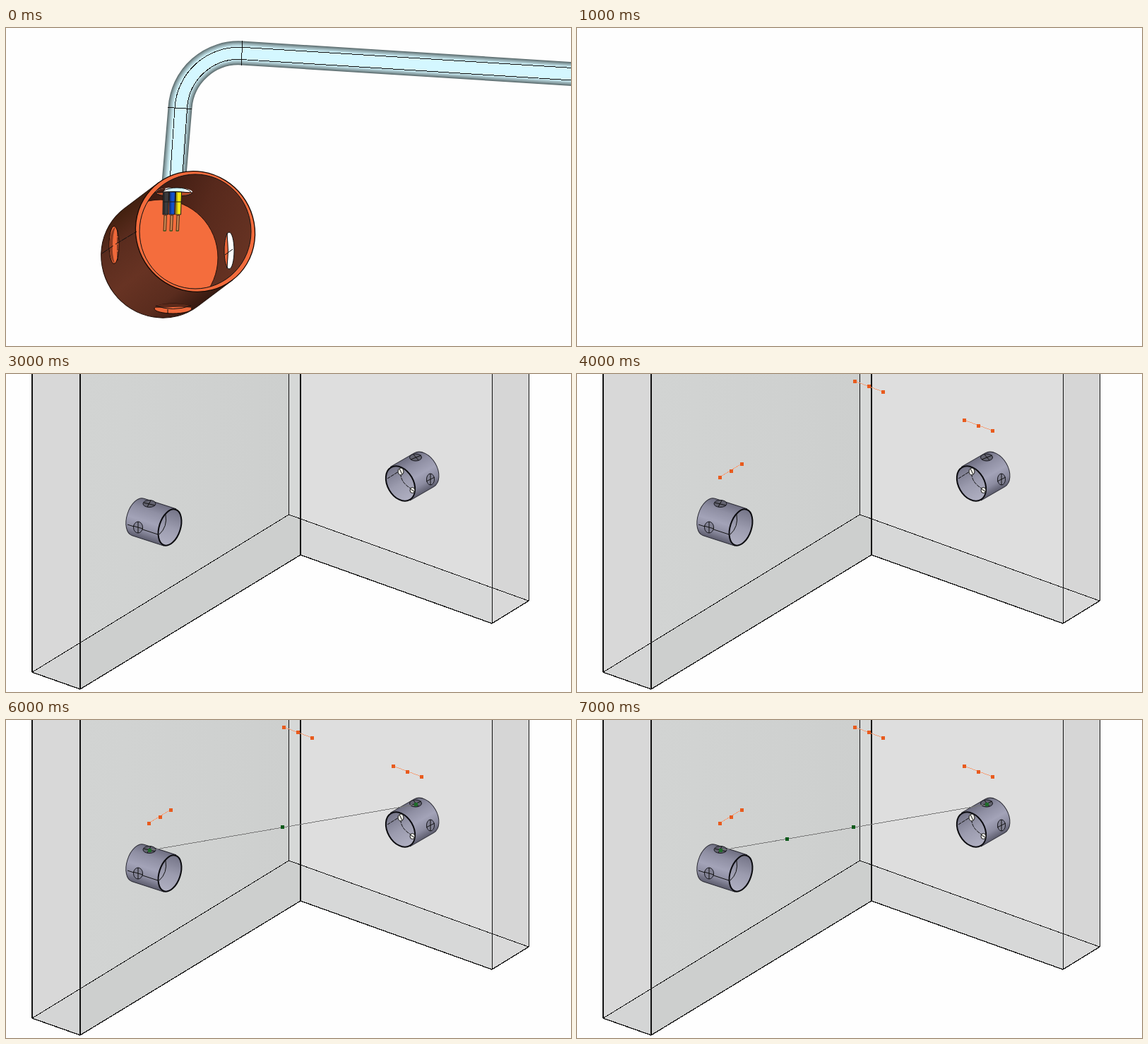
These frames come from a looping animation (800 px wide and 450 px high, 8000 ms). An HTML page:

```html
<!DOCTYPE html>
<html lang="en">
<head>
<meta charset="utf-8">
<title>Conduit between two boxes</title>
<style>
html, body { margin: 0; width: 100%; height: 100%; overflow: hidden; background: #fefefe; }
svg { display: block; width: 100vw; height: 100vh; }
.step { animation: 8s step-end infinite; }
#detail { animation-name: detail; }
#walls { animation-name: walls; }
#boxes { animation-name: boxes; }
#guides { animation-name: guides; }
#ends { animation-name: ends; }
#draft { animation-name: draft; }
#wire { animation-name: wire; }
#knot { animation-name: knot; }
@keyframes detail { 0% { opacity: 1 } 12.5%, 100% { opacity: 0 } }
@keyframes walls { 0% { opacity: 0 } 25%, 100% { opacity: 1 } }
@keyframes boxes { 0% { opacity: 0 } 37.5%, 100% { opacity: 1 } }
@keyframes guides { 0% { opacity: 0 } 50%, 100% { opacity: 1 } }
@keyframes ends { 0% { opacity: 0 } 62.5%, 100% { opacity: 1 } }
@keyframes draft { 0% { opacity: 0 } 62.5% { opacity: 1 } 75%, 100% { opacity: 0 } }
@keyframes wire { 0% { opacity: 0 } 75%, 100% { opacity: 1 } }
@keyframes knot { 0% { opacity: 0 } 87.5%, 100% { opacity: 1 } }
.ln { fill: none; stroke: #111; stroke-width: 1; }
.crisp { shape-rendering: crispEdges; }
.hole { fill: #62626f; stroke: #16161c; }
</style>
</head>
<body>
<svg viewBox="0 0 800 450" preserveAspectRatio="none">
<defs>
  <linearGradient id="outer" gradientUnits="userSpaceOnUse" x1="0" y1="-87" x2="0" y2="87">
    <stop offset="0" stop-color="#42200f"/><stop offset=".2" stop-color="#5a2c1e"/>
    <stop offset=".5" stop-color="#673323"/><stop offset=".8" stop-color="#5a2c1e"/><stop offset="1" stop-color="#371910"/>
  </linearGradient>
  <linearGradient id="inner" gradientUnits="userSpaceOnUse" x1="190" y1="250" x2="345" y2="320">
    <stop offset="0" stop-color="#3a1a11"/><stop offset=".5" stop-color="#57291c"/><stop offset="1" stop-color="#673323"/>
  </linearGradient>
  <linearGradient id="steel" gradientUnits="userSpaceOnUse" x1="0" y1="-27" x2="0" y2="27">
    <stop offset="0" stop-color="#6f6f82"/><stop offset=".25" stop-color="#8f8fa3"/>
    <stop offset=".55" stop-color="#a3a3b8"/><stop offset=".8" stop-color="#8c8ca0"/><stop offset="1" stop-color="#5f5f70"/>
  </linearGradient>
  <linearGradient id="bore" x1="0" y1="0" x2="0" y2="1">
    <stop offset="0" stop-color="#747487"/><stop offset=".5" stop-color="#9b9bae"/><stop offset="1" stop-color="#b0b0c2"/>
  </linearGradient>
  <linearGradient id="side" x1="0" y1="0" x2="1" y2="0">
    <stop offset="0" stop-color="#d2d4d3"/><stop offset="1" stop-color="#cdcfce"/>
  </linearGradient>
  <clipPath id="mouth"><ellipse cx="268" cy="288" rx="79" ry="81"/></clipPath>
  <clipPath id="slot"><ellipse cx="316" cy="315" rx="7" ry="26"/></clipPath>
  <clipPath id="entry"><ellipse cx="238" cy="232" rx="26" ry="6"/></clipPath>
</defs>

<g id="detail" class="step">
  <g id="pipe" fill="none"></g>
  <g class="ln crisp">
    <path d="M810 57L334.500 27.300A91 91 0 0 0 239 113L232.500 210M810 74.500L333.500 44.500A73 73 0 0 0 256.500 114L250 208"/>
    <path d="M335 18L333 53M229 112.500L263 114.500"/>
  </g>
  <g transform="translate(268 288) rotate(-37)">
    <path d="M0-86.500H-61A83.500 86.500 0 0 0-61 86.500H0Z" fill="url(#outer)" stroke="#1d0c06"/>
    <ellipse rx="83.500" ry="86.500" fill="#f26b3c" stroke="#160904" stroke-width="1.300"/>
  </g>
  <g clip-path="url(#mouth)">
    <rect x="180" y="200" width="180" height="180" fill="url(#inner)"/>
    <ellipse cx="219" cy="325" rx="81" ry="82" fill="#f46d3d" stroke="#2a1109"/>
  </g>
  <ellipse class="ln" cx="268" cy="288" rx="79" ry="81"/>
  <g clip-path="url(#entry)">
    <rect x="210" y="224" width="56" height="16" fill="#fefefe"/>
    <path d="M229 224H252V234H229Z" fill="#d4f7ff"/>
    <path d="M210 233Q238 230 266 233V240H210Z" fill="#b84e2b"/>
    <path d="M210 224H228L222 233H210Z" fill="#471f14"/>
  </g>
  <path class="ln" d="M212 233Q238 230 264 233Q262 238 238 238Q214 238 212 233M222 231Q230 226 242 226Q256 226 262 232"/>
  <g clip-path="url(#slot)">
    <rect x="308" y="288" width="16" height="54" fill="#fefefe"/>
    <path d="M308 288H313Q316 315 313 342H308Z" fill="#e96539"/>
  </g>
  <path class="ln" d="M313 290Q316 315 313 340M310 321L321 313"/>
  <ellipse class="ln" cx="316" cy="315" rx="7" ry="26"/>
  <ellipse cx="153" cy="307" rx="7" ry="26.500" fill="#ee683a" stroke="#160904"/>
  <path d="M155 281Q147 287 146.500 307Q147 328 154 333Q150 320 151 307Q151 292 155 281Z" fill="#8c3c22"/>
  <path class="ln" d="M136 319L152 308M155 306L185 288M158 286V329" stroke-dasharray="9 1"/>
  <ellipse cx="236.500" cy="397" rx="26.500" ry="7" fill="#ee683a" stroke="#160904"/>
  <path d="M210 396Q213 390 236 390Q260 390 263 396Q250 394 236 395Q222 396 210 396Z" fill="#5a291a"/>
  <path class="ln" d="M212 393Q236 402 262 393M229 398V404"/>
  <g id="cores" stroke="#1a1a1a"></g>
</g>

<g id="walls" class="step">
  <path d="M37 0H105V446L37 422Z" fill="#d8d8d8"/>
  <path d="M105 0H417V256L105 446Z" fill="url(#side)"/>
  <path d="M400 0H417V205L400 199Z" fill="#d6d8d7"/>
  <path d="M105 380L400 199L417 205V256L105 446Z" fill="#cdcfce"/>
  <path d="M37 422L105 380V446Z" fill="#d4d5d5"/>
  <path d="M417 0H688V303L417 205Z" fill="#dedede"/>
  <path d="M417 205L688 303V353L417 256Z" fill="#d7d8d8"/>
  <path d="M688 0H740V321L688 303Z" fill="#d6d6d6"/>
  <path d="M688 303L740 321L688 353Z" fill="#d9d9d9"/>
  <g class="ln crisp">
    <path d="M400.500 0V199M688.500 0V353M740.500 0V321M37 422L400.500 199L740 321"/>
    <path d="M37 422L105 446L417 256L688 353L740 321" stroke-width="1.300"/>
    <path d="M37 0V422M105 0V446M417 0V256" stroke-width="2"/>
  </g>
</g>

<g id="boxes" class="step">
  <g transform="translate(232 217) rotate(18)">
    <path d="M0-27.500H-47.500A15.500 27.500 0 0 0-47.500 27.500H0Z" fill="url(#steel)" stroke="#2a2a33"/>
    <ellipse rx="15" ry="26.500" fill="url(#bore)" stroke="#0c0c10" stroke-width="2"/>
  </g>
  <path class="ln" d="M172 213L215 227M226 199Q229 216 217 227"/>
  <ellipse class="hole" cx="203" cy="183.500" rx="9" ry="5"/>
  <ellipse class="hole" cx="187" cy="217" rx="6.500" ry="8" style="fill:#828294"/>
  <path class="ln" d="M195 182L211 186M205 179L200 188M180 215L194 219M187 209V225"/>
  <g transform="translate(558.500 155) rotate(-30)">
    <path d="M0-27.500H38.500A18.500 27.500 0 0 1 38.500 27.500H0Z" fill="url(#steel)" stroke="#2a2a33"/>
    <ellipse rx="18.300" ry="26.500" fill="url(#bore)" stroke="#0c0c10" stroke-width="2"/>
  </g>
  <path class="ln" d="M540 148L556 138M559 135Q556 154 577 164" stroke-dasharray="5 1"/>
  <ellipse cx="559" cy="138" rx="4" ry="5" fill="#eeeee8" stroke="#111"/>
  <ellipse cx="575.500" cy="164.500" rx="3.500" ry="4" fill="#eeeee8" stroke="#111"/>
  <path class="ln" d="M557 134L561 142M573 163L578 166"/>
  <ellipse class="hole" cx="580" cy="118" rx="8.500" ry="5"/>
  <ellipse class="hole" cx="601" cy="149" rx="5.500" ry="8" style="fill:#828294"/>
  <path class="ln" d="M573 121L588 115M577 114L584 122M595 152L607 146M601 141V157"/>
</g>

<g id="guides" class="step crisp" fill="#e85b1e" stroke="#f3a17c"></g>
<g id="draft" class="step crisp"><path d="M204 184.500L580 119.500" stroke="#22ff22" stroke-width="1.200"/></g>
<g id="wire" class="step crisp">
  <path d="M206 184L578 120" stroke="#777"/>
  <rect x="389" y="149" width="5" height="5" fill="#0b5a1a"/>
</g>
<g id="ends" class="step crisp" fill="#1f6b2a">
  <rect x="201" y="182" width="5" height="5"/><rect x="578" y="117" width="5" height="5"/>
</g>
<rect id="knot" class="step crisp" x="295" y="166" width="5" height="5" fill="#0b5a1a"/>
</svg>
<script>
const add = (id, markup) => document.getElementById(id).innerHTML += markup;

// Nested strokes shade the tube from its rim to the flat middle
const rim = [92, 108, 110], mid = [212, 247, 255], layers = 9;
for (let i = 0; i < layers; i++) {
  const k = Math.pow(i / (layers - 1), 0.8);
  const rgb = rim.map((c, j) => Math.round(c + (mid[j] - c) * k));
  add('pipe', `<path d="M810 65.600L334 35.500A83 83 0 0 0 246.500 113L237 225" stroke="rgb(${rgb})" stroke-width="${34 - i * 2}"/>`);
}

// Insulated cores with bare copper tips
['#3b3b3d', '#1450c8', '#f5e611'].forEach((color, i) => {
  const x = 222.5 + i * 9;
  add('cores', `<path d="M${x} 232h8l-1 32h-7.500z" fill="${color}"/>
    <path d="M${x + 0.8} 233h1.500v30h-1.500z" fill="#000" opacity=".35" stroke="none"/>
    <path d="M${x + 0.5} 246h8" fill="none"/>
    <path d="M${x + 1.5} 265h3.500l-1 22h-3.500z" fill="#c98450" stroke="#4c2a14"/>
    <path d="M${x} 287h4" stroke="#2c6a20" fill="none"/>`);
});

// Wall guides: start, middle and end handles
[[393, 10, 413, 17, 433, 25], [548, 65, 568, 73, 588, 80], [202, 146, 218, 137, 233, 127]].forEach(p => {
  add('guides', `<path d="M${p[0]} ${p[1]}L${p[4]} ${p[5]}"/>`);
  for (let i = 0; i < 6; i += 2)
    add('guides', `<rect x="${p[i] - 2}" y="${p[i + 1] - 2}" width="5" height="5" stroke="none"/>`);
});
</script>
</body>
</html>
```
